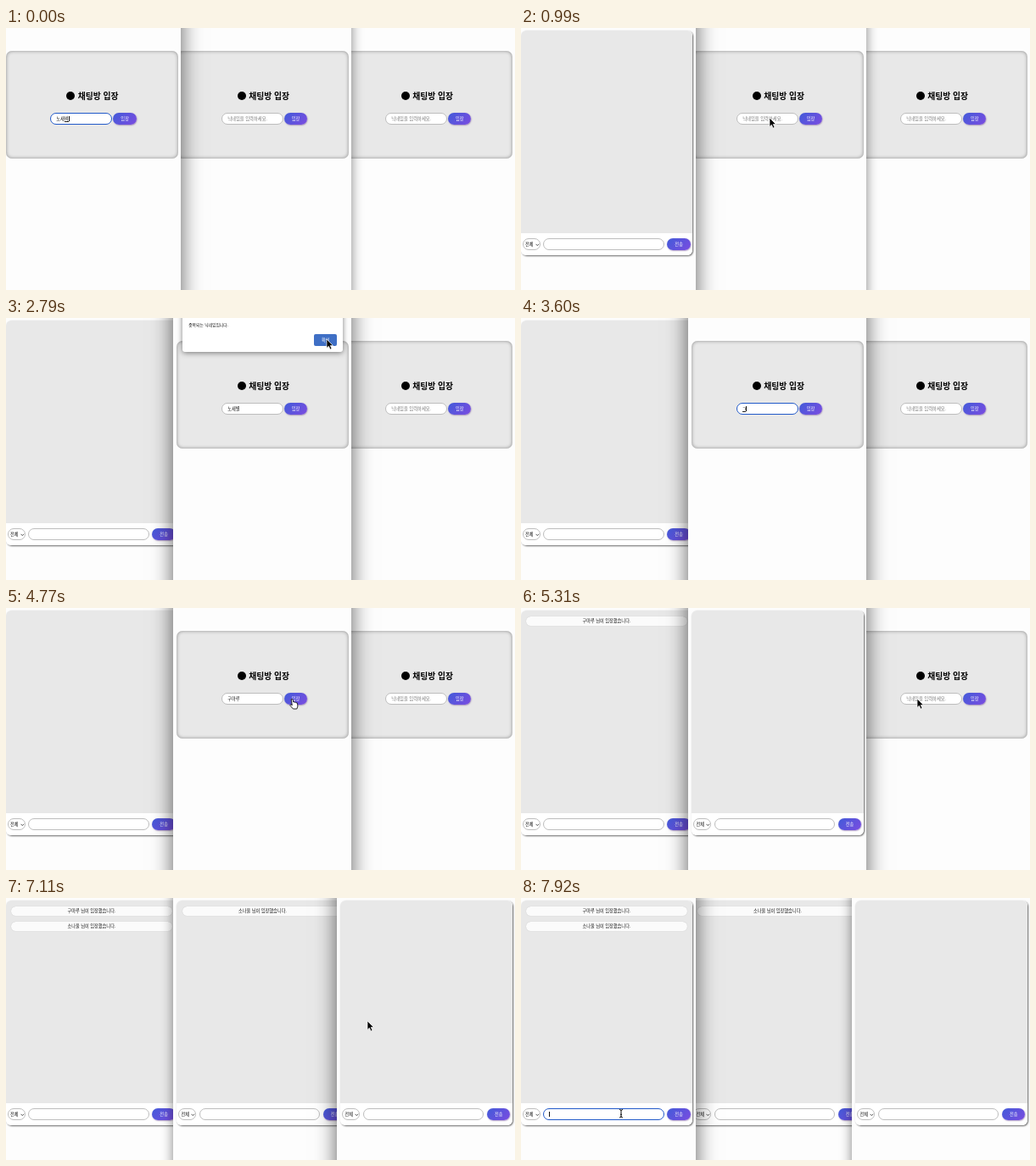
Recreate the animation shown at these times as an HTML page. Size 600 by 309 pixels, loop 8000 ms.

```html
<!DOCTYPE html>
<html lang="ko">
<head>
<meta charset="utf-8">
<title>채팅방</title>
<style>
  html, body { margin: 0; width: 100%; height: 100%; overflow: hidden; background: #fdfdfd; }
  body { position: relative; font: 500 5.2px/1 "Noto Sans CJK KR", "Noto Sans CJK", "Noto Sans", sans-serif; color: #111; }
  div, i, svg { position: absolute; box-sizing: border-box; white-space: nowrap; }
  .win { top: -40px; width: 210px; height: 400px; background: #fdfdfd; box-shadow: 0 0 13px rgba(0,0,0,.48); }
  .win.active { box-shadow: 0 0 24px rgba(0,0,0,.62); }
  .page { left: 0; top: 40px; width: 210px; height: 309px; }

  .card { left: 4px; top: 27px; width: 203px; height: 126.5px; border-radius: 7px; background: #e8e8e8; box-shadow: inset 0 0 4px rgba(0,0,0,.4); }
  .mark { left: 75.5px; top: 75px; width: 10px; height: 10px; border-radius: 50%; background: #000; }
  .title { left: 89px; top: 74px; font-size: 9.8px; line-height: 12px; font-weight: 700; color: #000; }

  .field { height: 14px; border: 1px solid #bdbdbd; border-radius: 7px; background: #fff; line-height: 12px; padding-left: 6.5px; }
  .field.focus { border: 1.5px solid #2159c9; line-height: 11px; padding-left: 6px; }
  .nick { left: 56.5px; top: 100px; width: 73px; }
  .hint { color: #777; font-weight: 400; font-size: 5.3px; }
  .field u { text-decoration: none; border-bottom: .8px solid #222; }
  .field b { display: inline-block; width: .7px; height: 6px; background: #111; vertical-align: -1px; }
  .btn { width: 27.5px; height: 14px; border-radius: 7px; line-height: 13.5px; text-align: center; color: #fff;
         background: linear-gradient(135deg, #425bd9, #7b4ce0); box-shadow: .5px .7px 1.5px rgba(90,50,130,.55); }
  .enter { left: 130.7px; top: 100px; }

  .list { left: 83.5px; top: 118px; width: 45.5px; padding: 2px 0; border-radius: 1.5px; background: #fff; box-shadow: 0 .5px 2.5px rgba(0,0,0,.4); }
  .list p { margin: 0; padding-left: 5px; line-height: 15px; }
  .list i { left: 6px; top: -3px; border: 3px solid transparent; border-top: 0; border-bottom-color: #fff; }

  .chat { left: 4px; top: 3px; width: 202.5px; height: 265px; border-radius: 6px; overflow: hidden; background: #fff; }
  .chatShade { left: 4px; top: 3px; width: 202.5px; height: 265px; border-radius: 6px; box-shadow: 1px 1px 2px rgba(0,0,0,.6); }
  .log { left: 0; top: 0; width: 100%; height: 238.5px; background: #e8e8e8; }
  .msg { left: 6.5px; width: 189.5px; height: 11px; border-radius: 5.5px; background: #fbfbfb; box-shadow: 0 0 1px rgba(0,0,0,.2); text-align: center; line-height: 10.5px; }
  .who { left: 6px; top: 248px; width: 21px; padding-left: 2.2px; }
  .who svg { left: 14.2px; top: 5px; }
  .say { left: 30.7px; top: 248px; width: 142.5px; }
  .send { left: 176.7px; top: 248px; }

  .alert { left: 11px; top: -20px; width: 188.5px; height: 60px; border-radius: 3px; background: #fff; box-shadow: 0 1px 6px rgba(0,0,0,.5); }
  .alert .text { left: 7px; top: 26px; font-size: 4.8px; }
  .alert .ok { left: 155px; top: 39.3px; width: 27px; height: 14px; border-radius: 2px; background: #3f6fc5; color: #fff; line-height: 13px; text-align: center; }
  #cursor { z-index: 9; overflow: visible; width: 1px; height: 1px; }
</style>
</head>
<body>
<svg id="cursor">
  <path data-kind="arrow" d="M0 0V10.4L2.4 8.2L4.1 12.1L6 11.3L4.3 7.5H7.5Z" fill="#000" stroke="#fff" stroke-width=".7"/>
  <path data-kind="hand" d="M1.2 .8Q2.4 -.5 3 1L3.8 4Q5 3.3 5.5 4.3Q6.8 3.6 7.1 4.8Q8.4 4.4 8.6 6L8.9 9L7.8 12H3.5L.3 8.5Q-.7 7 .7 6.8L2.3 7.7Z" fill="#fff" stroke="#111" stroke-width=".9"/>
  <path data-kind="beam" d="M-2 -4.5Q0 -4.5 0 -3Q0 -4.5 2 -4.5M0 -3V4M-2 5Q0 5 0 3.5Q0 5 2 5M-1 1.3H1" fill="none" stroke="#111" stroke-width="1"/>
</svg>
<script>
const LOOP = 8000, STEP = 90;
const LEFTS = [-4.3, 197.2, 390.3];
const [HOST, GUEST, THIRD] = ["노새별", "구마루", "소나울"];
const SUGGESTIONS = ["노노", HOST, HOST + "변경", HOST + "닉네임"];

const events = [];
const at = (time, win, patch) => events.push({ time, win, patch });
const raise = (time, order) => at(time, -1, { order });
const join = name => name + " 님이 입장했습니다.";
const type = (win, start, gap, words) =>
  words.split(" ").forEach((text, i) => at(start + i * gap, win, { text, composing: true }));

// First window enters the room
at(90, 0, { list: 3 });
at(270, 0, { text: HOST });
at(450, 0, { list: 0, focus: false, composing: false });
at(540, 0, { chat: true });

// Second window tries a taken nickname, then another
raise(1080, [2, 0, 1]);
at(1170, 1, { focus: true });
type(1, 1350, 90, "ㄴ 노");
at(1440, 1, { list: 4 });
type(1, 1890, 180, "놋 노새");
at(2070, 1, { list: 3 });
type(1, 2160, 90, "노샙 노새벼 노새별");
at(2430, 1, { list: 0, focus: false, composing: false });
at(2520, 1, { alert: true });
at(2880, 1, { alert: false });
at(3330, 1, { focus: true });
at(3510, 1, { text: "" });
type(1, 3600, 90, "ㄱ");
type(1, 3960, 90, "구 굼 구마 구말 구마루");
at(4500, 1, { focus: false, composing: false });
at(4860, 1, { chat: true });
at(4860, 0, { msgs: [join(GUEST)] });

// Third window enters
raise(5400, [0, 1, 2]);
at(5490, 2, { focus: true });
type(2, 5760, 90, "ㅅ 소");
type(2, 6120, 90, "손 소나 소낭 소나울");
at(6750, 2, { focus: false, composing: false });
at(6930, 2, { chat: true });
at(6930, 0, { msgs: [join(GUEST), join(THIRD)] });
at(6930, 1, { msgs: [join(THIRD)] });

raise(7560, [1, 2, 0]);
at(7740, 0, { focus: true });
events.sort((a, b) => a.time - b.time);

const pointer = [
  [0, 0, 0, ""], [360, 139, 107, "hand"], [540, 139, 107, "arrow"], [900, 293, 104, "arrow"],
  [1080, 293, 107, "beam"], [1260, 293, 107, ""], [2340, 341, 107, "hand"], [2520, 341, 107, "arrow"],
  [2700, 378, 25, "arrow"], [2970, 378, 25, "arrow"], [3240, 300, 107, "beam"], [3600, 300, 107, ""],
  [4410, 310, 107, "beam"], [4590, 335, 107, "hand"], [4950, 335, 107, "arrow"],
  [5400, 482, 107, "beam"], [5670, 482, 107, ""], [6660, 500, 107, "beam"], [6750, 534, 107, "hand"],
  [6930, 534, 107, "arrow"], [7470, 118, 254, "arrow"], [7560, 118, 254, "beam"], [LOOP, 118, 254, "beam"]
];

const div = (cls, body = "") => `<div class="${cls}">${body}</div>`;

function field(s) {
  if (!s.text) return s.focus ? "<b></b>" : '<span class="hint">닉네임을 입력하세요.</span>';
  if (!s.composing) return s.text;
  return `${s.text.slice(0, -1)}<u>${s.text.slice(-1)}</u><b></b>`;
}

function loginPage(s) {
  const items = s.list ? SUGGESTIONS.slice(-s.list).map(x => `<p>${x}</p>`).join("") : "";
  return div("card") + div("mark") + div("title", "채팅방 입장") +
    div("field nick" + (s.focus ? " focus" : ""), field(s)) + div("btn enter", "입장") +
    (items && div("list", "<i></i>" + items)) +
    (s.alert ? div("alert", div("text", "중복되는 닉네임입니다.") + div("ok", "확인")) : "");
}

function chatPage(s) {
  const msgs = s.msgs.map((m, i) => `<div class="msg" style="top:${7 + i * 18.2}px">${m}</div>`).join("");
  const chevron = '<svg width="5" height="4"><path d="M.5.8L2.3 2.6L4.1.8" fill="none" stroke="#222" stroke-width=".8"/></svg>';
  return div("chatShade") + div("chat", div("log", msgs)) + div("field who", "전체" + chevron) +
    div("field say" + (s.focus ? " focus" : ""), s.focus ? "<b></b>" : "") + div("btn send", "전송");
}

const windows = LEFTS.map(left => {
  const el = document.createElement("div"), page = document.createElement("div");
  page.className = "page";
  el.style.left = left + "px";
  el.append(page);
  document.body.append(el);
  return { el, page, html: "" };
});
const cursor = document.getElementById("cursor");

function stateAt(t) {
  const wins = LEFTS.map(() => ({ text: "", msgs: [] }));
  Object.assign(wins[0], { text: "노새벼", composing: true, focus: true });
  const desk = { order: [2, 1, 0] };
  for (const e of events) if (e.time <= t) Object.assign(wins[e.win] || desk, e.patch);
  return { wins, order: desk.order };
}

function drawCursor(t) {
  const i = pointer.findLastIndex(p => p[0] <= t);
  const [t0, x0, y0, kind] = pointer[i];
  const [t1, x1, y1, nextKind] = pointer[i + 1] || pointer[i];
  let k = kind && nextKind && t1 > t0 ? (t - t0) / (t1 - t0) : 0;
  k = k * k * (3 - 2 * k);
  cursor.style.left = x0 + (x1 - x0) * k + "px";
  cursor.style.top = y0 + (y1 - y0) * k + "px";
  for (const p of cursor.children) p.style.display = p.dataset.kind === kind ? "" : "none";
}

function draw(now) {
  const t = Math.floor((now % LOOP) / STEP) * STEP;
  const { wins, order } = stateAt(t);
  windows.forEach((w, i) => {
    const html = wins[i].chat ? chatPage(wins[i]) : loginPage(wins[i]);
    if (html !== w.html) w.page.innerHTML = w.html = html;
    w.el.style.zIndex = order.indexOf(i) + 1;
    w.el.className = order[2] === i ? "win active" : "win";
  });
  drawCursor(t);
}

const start = performance.now();
function loop() {
  draw(performance.now() - start);
  requestAnimationFrame(loop);
}
loop();
</script>
</body>
</html>
```
